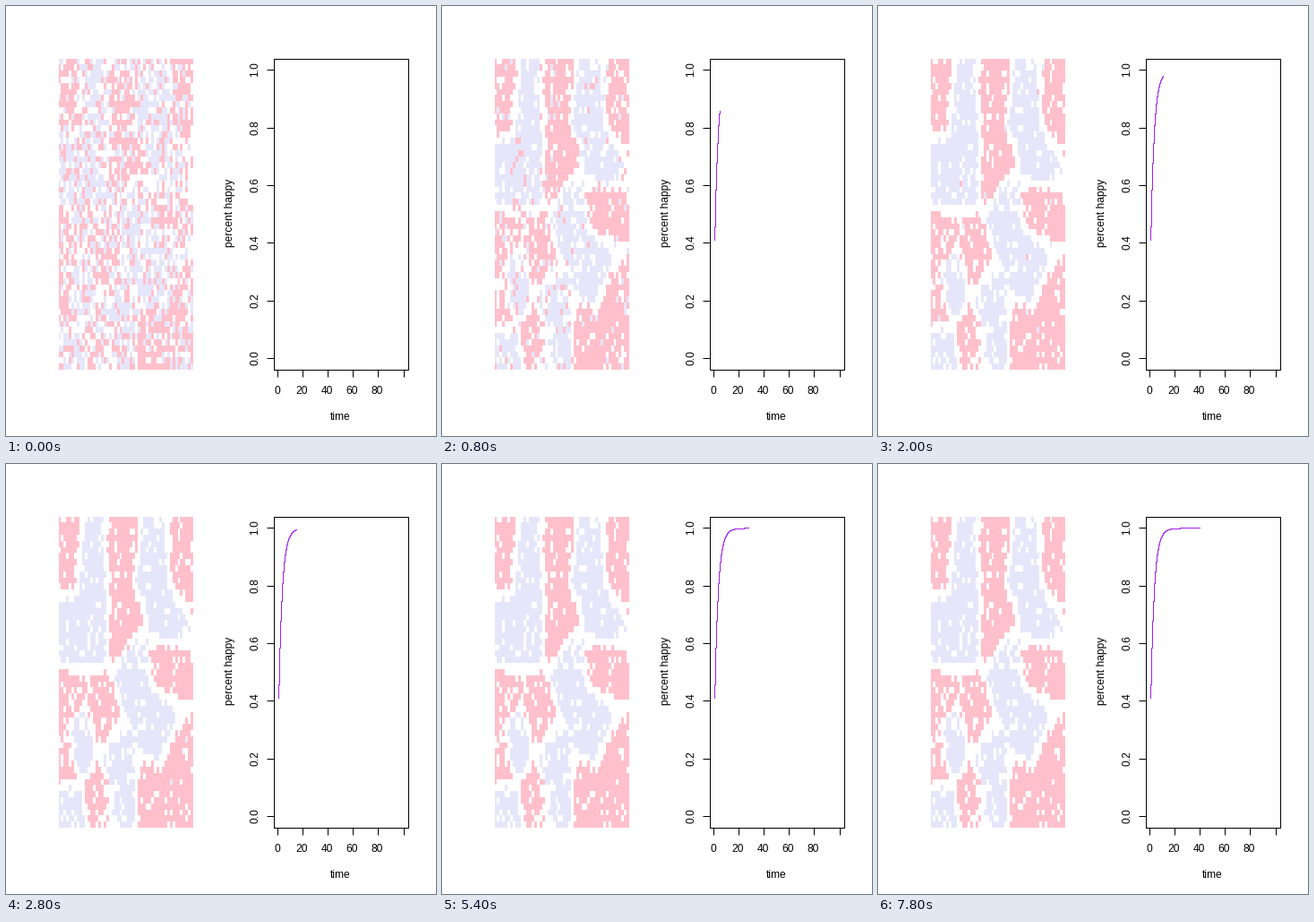
Write a matplotlib script that moves like this. It is 480 px wide and 480 px high and loops after 8 s.

```python
import numpy as np
import matplotlib.pyplot as plt
from matplotlib.animation import FuncAnimation
from matplotlib.colors import ListedColormap
from matplotlib.patches import Rectangle

plt.rcParams["font.family"] = "Liberation Sans"
SIZE, DPI, PX = 480, 96, 0.75   # PX: one pixel in points
N, STEPS, INTERVAL = 51, 40, 200
EMPTY, PINK, LAVENDER = 0, 1, 2
LEFT, RIGHT, TOP, BOTTOM = 59.04, 209.76, 59.04, 406.56

rng = np.random.default_rng(7)

# A few neighbourhood centres as (column, row)
pink_hubs = [(3, 4), (23, 5), (24, 17), (46, 7), (40, 24), (3, 28),
             (16, 33), (45, 41), (34, 46), (15, 44), (2, 40)]
lavender_hubs = [(12, 6), (12, 16), (36, 8), (40, 16), (4, 20), (28, 25),
                 (37, 33), (9, 37), (20, 40), (3, 47), (24, 46)]


def happy(t):
    """Share of content agents at time t."""
    return 1 - 0.59 * np.exp(-0.385 * (t - 1) ** 0.95)


def nearest(hubs):
    rows, cols = np.mgrid[:N, :N]
    return np.min([np.hypot(cols - c, rows - r) for c, r in hubs], axis=0)


def settled_town():
    """Pink and lavender quarters with empty cells along their borders."""
    lean = nearest(lavender_hubs) - nearest(pink_hubs)
    lean += rng.normal(0, 0.6, lean.shape)
    town = np.where(lean > 0, PINK, LAVENDER)
    town[np.abs(lean) < np.quantile(np.abs(lean), 0.2)] = EMPTY
    town[rng.random(town.shape) < 0.12] = EMPTY
    return town


def simulate():
    """Agents wander at random until each cell reaches its settled state."""
    goal = settled_town()
    patience = rng.random(goal.shape)
    drift = rng.permutation(goal.ravel()).reshape(goal.shape)
    towns = []
    for t in range(1, STEPS + 1):
        towns.append(np.where(patience < happy(t), goal, drift))
        moved = rng.random(goal.shape) < 0.4
        drift = np.where(moved, rng.choice(goal.ravel(), goal.shape), drift)
    return towns


def time_x(t):
    return np.floor(304.62 + 1.4097 * (t - 1))


def share_y(v):
    return np.floor(393.69 - 321.78 * v)


def stroke(xs, ys):
    ax.plot(xs, ys, color="black", lw=PX, solid_capstyle="butt", snap=True)


def label(x, y, text, angle=0):
    ax.text(x, y, text, size=12 * PX, color="black", rotation=angle,
            ha="center", va="baseline", rotation_mode="anchor")


towns = simulate()
fig = plt.figure(figsize=(SIZE / DPI, SIZE / DPI), dpi=DPI, facecolor="white")
ax = fig.add_axes([0, 0, 1, 1])
ax.axis("off")

cells = ax.pcolormesh(np.floor(np.linspace(LEFT, RIGHT, N + 1)),
                      np.floor(np.linspace(TOP, BOTTOM, N + 1)),
                      towns[0], vmin=0, vmax=2, antialiased=False,
                      cmap=ListedColormap(["white", "#ffc0cb", "#e6e6fa"]))
curve, = ax.plot([], [], color="#a020f0", lw=PX, snap=True,
                 drawstyle="steps-post")

ax.add_patch(Rectangle((299, 59), 150, 347, fill=False, ec="black", lw=PX,
                       snap=True))
for v in np.arange(6) / 5:
    y = share_y(v)
    stroke([291, 299], [y, y])
    label(281.5, y - 0.5, f"{v:.1f}", 90)
for t in range(0, 101, 20):
    x = time_x(t)
    stroke([x, x], [406, 414])
    if t < 100:
        label(x - 0.5, 433, str(t))
label(373.5, 462, "time")
label(253.5, 231, "percent happy", 90)

ax.set_xlim(0, SIZE)
ax.set_ylim(SIZE, 0)


def draw(k):
    cells.set_array(towns[k])
    # Fine sampling on whole pixels gives a crisp stepped line
    t = np.linspace(1, k + 1, 10 * k + 1) if k else np.array([])
    curve.set_data(time_x(t), share_y(happy(t)))
    return cells, curve


anim = FuncAnimation(fig, draw, frames=STEPS, interval=INTERVAL,
                     repeat=True, repeat_delay=0)
plt.show()
```
